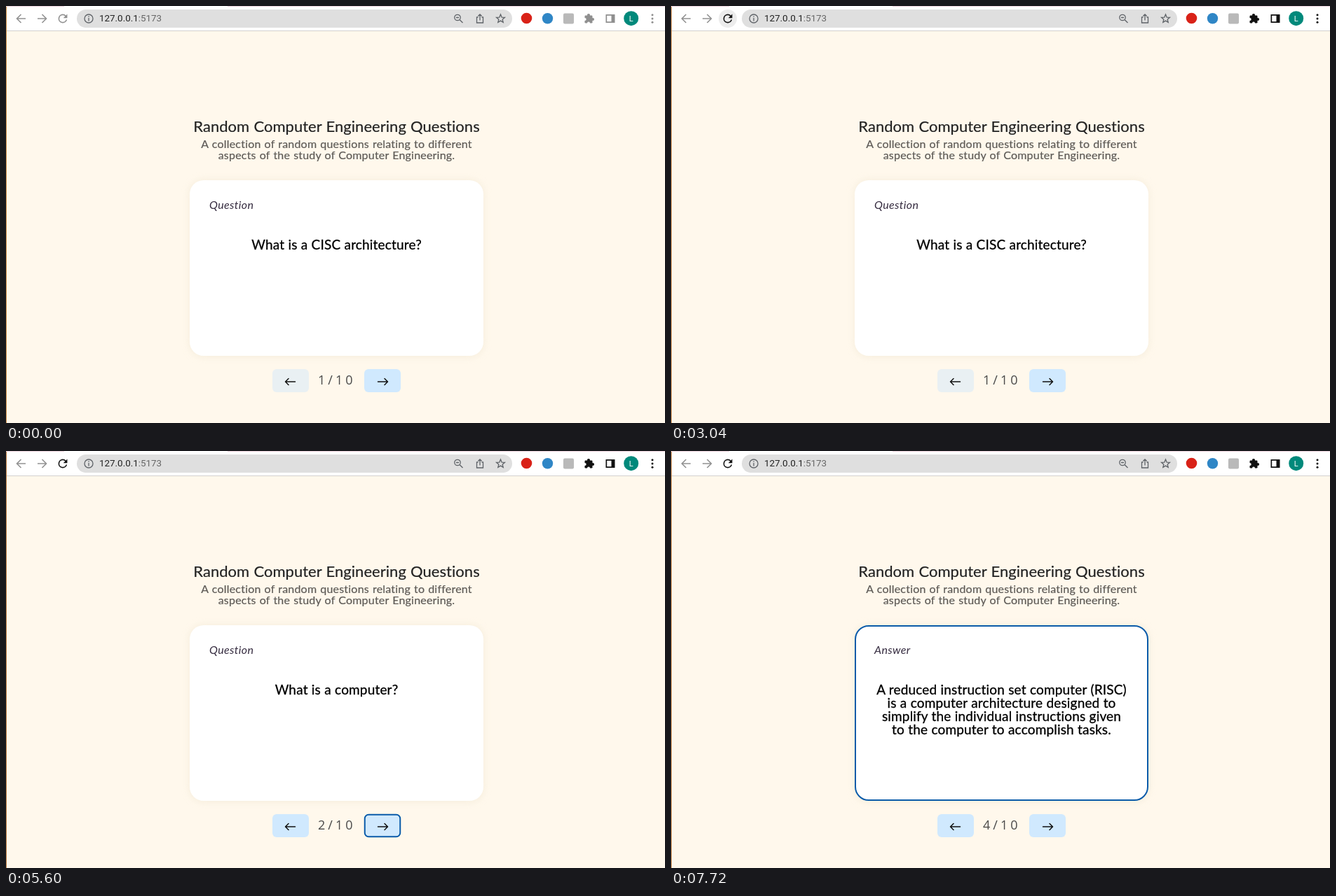
Animation, 940 px wide and 596 px high, one loop 8000 ms. Source, as an HTML page:

```html
<!DOCTYPE html>
<html lang="en">
<head>
<meta charset="utf-8">
<title>Question cards</title>
<style>
  html, body { margin: 0; width: 100%; height: 100%; overflow: hidden; background: #fff8ec; }
  svg { display: block; width: 940px; height: 596px; }
  text { font-family: Lato, "Open Sans", sans-serif; stroke-linejoin: round; white-space: pre; }
  .mid { text-anchor: middle; }
  .title { font-size: 22px; letter-spacing: .04px; word-spacing: .5px; fill: #222; stroke: #222; stroke-width: .2px; }
  .sub { font-size: 16px; letter-spacing: .21px; word-spacing: .7px; fill: #5d5a56; stroke: #5d5a56; stroke-width: .2px; }
  .main { font-size: 19px; letter-spacing: .17px; word-spacing: .2px; fill: #000; stroke: #000; stroke-width: .3px; }
  .label { font-size: 16px; font-style: italic; letter-spacing: .35px; fill: #362c40; }
  .count { font: 18px "Open Sans", sans-serif; letter-spacing: 4px; fill: #4a4a4a; }
  .url { font: 13.4px Roboto, Arial, sans-serif; fill: #222; }
  .icon { fill: none; stroke: #5f6368; stroke-width: 1.3; }
  .nav { fill: none; stroke: #929292; stroke-width: 1.6; }
  .arrow { fill: none; stroke: #111; stroke-width: 1.5; stroke-linecap: round; stroke-linejoin: round; }
  .ring { fill: none; stroke: #0a5ba9; }
</style>
</head>
<body>
<svg viewBox="0 0 940 596" xmlns="http://www.w3.org/2000/svg">
  <defs>
    <filter id="soft" x="-10%" y="-15%" width="120%" height="130%">
      <feGaussianBlur stdDeviation="5"/>
    </filter>
  </defs>
  <rect width="940" height="596" fill="#fff8ec"/>

  <!-- browser bar -->
  <rect width="940" height="35" fill="#fff"/>
  <path d="M0 .5H83M316 .5H940" stroke="#ecd3dd"/>
  <path d="M0 35.5H940" stroke="#d2d1cf"/>
  <path id="edge" d="M.5 1V596" stroke="#c98a45"/>
  <path class="nav" d="M28 18H15.5M21.5 12L15.5 18L21.5 24M45 18H57.5M51.5 12L57.5 18L51.5 24"/>
  <circle id="halo" cx="81" cy="18" r="13"/>
  <path class="active" transform="translate(71.4 8.4) scale(.8)" d="M17.65 6.35A7.95 7.95 0 0 0 12 4a8 8 0 1 0 7.73 10h-2.08A6 6 0 1 1 12 6c1.66 0 3.14.69 4.22 1.78L13 11h7V4z"/>
  <rect x="101" y="5" width="621" height="26" rx="13" fill="#dfdfdf"/>
  <g class="icon">
    <circle cx="118" cy="18" r="6"/>
    <path d="M118 17V21.5M118 14.3V15.7"/>
    <circle cx="644" cy="16.5" r="4.2"/>
    <path d="M647.2 19.7L651.5 24M642 16.5H646"/>
    <path d="M673.5 16H671.5V24H680.5V16H678.5M676 20.5V12M673.3 14.5L676 11.8L678.7 14.5"/>
    <path id="star"/>
  </g>
  <text class="url" x="133" y="22.3">127.0.0.1<tspan fill="#666">:5173</tspan></text>
  <circle cx="742.5" cy="17.5" r="7.8" fill="#d92218"/>
  <circle cx="772.5" cy="17.7" r="7.7" fill="#2f86c6"/>
  <rect x="795" y="10.5" width="15" height="15" rx="2" fill="#b9b9b9"/>
  <g class="active">
    <rect x="825.5" y="13.5" width="11" height="11" rx="1.2"/>
    <circle cx="831" cy="13" r="2.1"/>
    <circle cx="837" cy="19" r="2.1"/>
    <circle cx="825.7" cy="19" r="2" fill="#fff"/>
    <circle cx="831" cy="24.6" r="2" fill="#fff"/>
    <path fill-rule="evenodd" d="M855.5 12H868.5V24H855.5ZM857.2 13.7V22.3H863.5V13.7Z"/>
    <circle cx="922" cy="12.8" r="1.5"/>
    <circle cx="922" cy="18" r="1.5"/>
    <circle cx="922" cy="23.2" r="1.5"/>
  </g>
  <circle cx="891.7" cy="17.7" r="10.5" fill="#00897b"/>
  <text class="mid" x="891.7" y="21.6" fill="#fff" style="font: 11px Roboto, sans-serif">L</text>

  <!-- page -->
  <text class="title mid" x="471.5" y="180">Random Computer Engineering Questions</text>
  <text class="sub mid" x="471.5" y="203.3">A collection of random questions relating to different</text>
  <text class="sub mid" x="471.5" y="219.3">aspects of the study of Computer Engineering.</text>
  <rect x="260" y="247" width="423" height="256" rx="22" fill="#f3ead8" opacity=".6" filter="url(#soft)"/>
  <rect x="262" y="249" width="419" height="251" rx="20" fill="#fff"/>
  <rect id="cardRing" class="ring" x="263" y="250" width="417" height="249" rx="19"/>
  <text id="label" class="label" x="290" y="290"></text>
  <g id="lines"></g>
  <rect id="prev" x="380" y="519" width="52" height="33" rx="6"/>
  <path class="arrow" d="M412.5 537H398.5M403 532.5L398.5 537L403 541.5"/>
  <text id="count" class="count" x="445" y="541.3"></text>
  <rect x="511" y="519" width="52" height="33" rx="6" fill="#d0e9fe"/>
  <rect id="nextRing" class="ring" x="511.75" y="519.75" width="50.5" height="31.5" rx="5.5"/>
  <path class="arrow" d="M530.5 537H544.5M540 532.5L544.5 537L540 541.5"/>
</svg>
<script>
const LOOP = 8000, STEP = 40;
const $ = id => document.getElementById(id);

const CISC = "What is a CISC architecture?";
const COMPUTER = "What is a computer?";
const BOOLEAN = "What is Boolean Logic?";
const MOSFET = "What does MOSFET stand for?";
const SYSTEM = "What is an Operating System?";
const ANSWER = "A reduced instruction set computer (RISC)\nis a computer architecture designed to\n" +
  "simplify the individual instructions given\nto the computer to accomplish tasks.";

// [start time, value]
const texts = [[0, CISC], [1560, COMPUTER], [2400, BOOLEAN], [3040, CISC], [3880, MOSFET],
  [4560, CISC], [5600, COMPUTER], [6280, SYSTEM], [6960, BOOLEAN], [7600, ANSWER]];
const pages = [[0, 1], [5600, 2], [6280, 3], [6960, 4]];
const PRESS = "#dedede", EASING = "#e5e5e5", HOVER = "#ececec";
const halos = [[0, "none"], [1360, HOVER],
  ...[[2200, 2400], [2920, 3040], [3640, 3880], [4360, 4560]].flatMap(([down, done]) =>
    [[down, PRESS], [down + 80, EASING], [done, HOVER]]),
  [4760, "none"]];

const at = (track, t) => track.findLast(([start]) => start <= t)[1];

function fade(t, start) {
  const u = Math.min(1, Math.max(0, (t - start) / 240));
  return 1 - (1 - u) ** 2;
}

function setRing(el, opacity, width) {
  el.setAttribute("opacity", opacity);
  el.setAttribute("stroke-width", width);
}

let shown = "";
function setText(text) {
  if (text === shown) return;
  shown = text;
  $("lines").innerHTML = text.split("\n").map((line, i) =>
    `<text class="main mid" x="471.5" y="${347.6 + 19 * i}">${line}</text>`).join("");
  $("label").textContent = text === ANSWER ? "Answer" : "Question";
}

function draw(now) {
  const t = Math.floor(now % LOOP / STEP) * STEP;
  const awake = t >= 1360;
  const page = at(pages, t);

  for (const el of document.querySelectorAll(".active"))
    el.setAttribute("fill", awake ? "#111" : "#8f8f8f");
  $("edge").setAttribute("stroke", awake ? "#b9793f" : "#c98a45");
  $("halo").setAttribute("fill", at(halos, t));

  setText(at(texts, t));
  $("count").textContent = page + "/10";
  $("prev").setAttribute("fill", page > 1 ? "#d0e9fe" : "#e9f0f3");

  const leave = fade(t, 7120);
  const nextFocus = t >= 5560;
  const cardFocus = t >= 7560;
  setRing($("nextRing"), cardFocus ? 0 : fade(t, 5120), nextFocus ? 2 - .6 * leave : 1);
  setRing($("cardRing"), leave, cardFocus ? 2 : 1);
}

const star = Array.from({ length: 10 }, (_, i) => {
  const r = i % 2 ? 2.8 : 6.3, a = (i / 5 - .5) * Math.PI;
  return (705.5 + r * Math.cos(a)).toFixed(2) + " " + (18.3 + r * Math.sin(a)).toFixed(2);
});
$("star").setAttribute("d", "M" + star.join("L") + "Z");

function tick() {
  draw(performance.now());
  requestAnimationFrame(tick);
}
tick();
</script>
</body>
</html>
```
